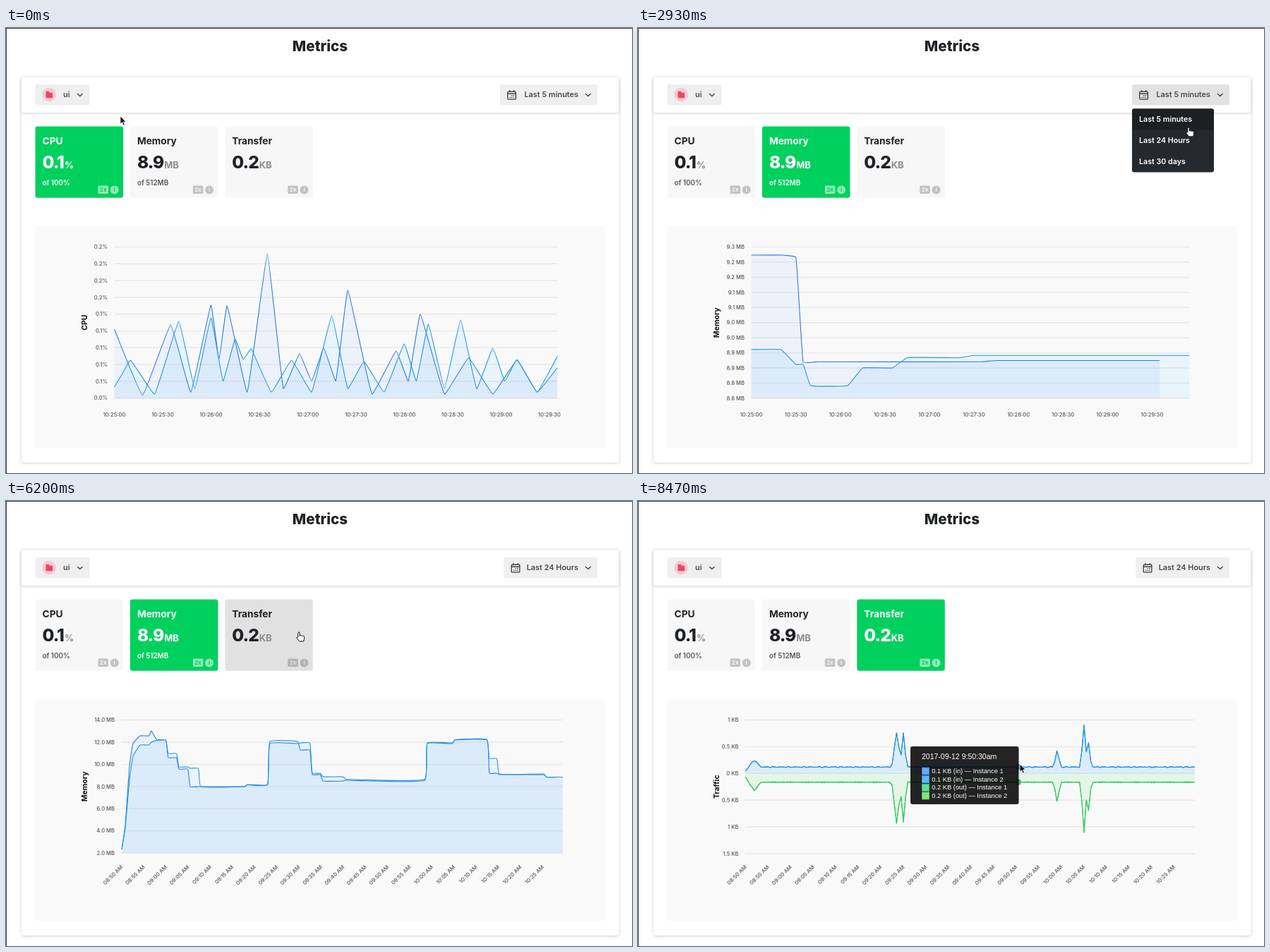
An HTML page that plays this animation: 887x631 px, repeating every 9.07 s.

```html
<!DOCTYPE html>
<html lang="en">
<head>
<meta charset="utf-8">
<title>Metrics</title>
<style>
  html, body { margin: 0; width: 100%; height: 100%; overflow: hidden; background: #fff; }
  svg { display: block; width: 887px; height: 631px; font-family: Inter, "Open Sans", sans-serif; }
  .panel { fill: #fff; filter: drop-shadow(0 1px 2px rgba(0, 0, 0, .18)); }
  .bold { font-weight: 700; }
  .title { font-size: 20.6px; font-weight: 800; fill: #1f2226; text-anchor: middle; }
  .button { fill: #efefef; }
  .button.hover { fill: #e2e2e2; }
  .label { font-size: 10.9px; font-weight: 600; fill: #4a4a4a; }
  .stroke { fill: none; stroke: #444; stroke-width: 1.4; }
  .card { fill: #1f2226; --bg: #f7f7f7; --badge: #c2c2c2; --unit: #8c8c8c; --note: #555; }
  .card.hover { --bg: #e1e1e1; --badge: #b3b3b3; }
  .card.active { fill: #fff; --bg: #00d05e; --badge: #8eeab6; --unit: #fff; --note: #fff; }
  .card .bg, .card .mark { fill: var(--bg); }
  .card .badge { fill: var(--badge); }
  .card .unit { fill: var(--unit); font-size: 13px; font-weight: 700; letter-spacing: 0; }
  .card .note { fill: var(--note); font-size: 9.9px; font-weight: 600; }
  .value { font-size: 24.5px; font-weight: 800; letter-spacing: -1px; }
  .grid { stroke: #e9e9e9; stroke-width: 1.5; }
  .tick { font-size: 7.6px; font-weight: 500; fill: #555; }
  .axis { font-size: 10.5px; font-weight: 700; fill: #111; text-anchor: middle; }
  .line { fill: none; stroke-width: 1.1; stroke-linejoin: round; }
  .item { font-size: 10.7px; font-weight: 600; fill: #fff; }
  #tip { font: 9.3px "Liberation Sans", Arial, sans-serif; fill: #fff; }
  #tip .head { font-size: 10.5px; }
</style>
</head>
<body>
<svg viewBox="0 0 887 631">
  <rect width="887" height="631" fill="#fff"/>
  <path d="M0 .5H887M.5 0V631" stroke="#444"/>
  <text class="title" x="445" y="33">Metrics</text>
  <rect class="panel" x="22" y="69.5" width="846.5" height="546.5" rx="3"/>
  <rect class="panel" x="22" y="69.5" width="846.5" height="50.5" rx="3"/>

  <rect class="button" x="41.5" y="80" width="77" height="29.5" rx="3"/>
  <circle cx="61" cy="94.5" r="10" fill="#f8ccd4"/>
  <path d="M56.5 91q0-1.2 1.2-1.2h2.8l1.4 2h3q1.2 0 1.2 1.2v5q0 1.2-1.2 1.2h-7.2q-1.2 0-1.2-1.2z" fill="#ee4560"/>
  <text class="label" x="81" y="98.3">ui</text>
  <path class="stroke" d="M101 93l3.8 3.6 3.8-3.6"/>

  <rect class="button" id="range" y="80" height="29.5" rx="3"/>
  <g id="calendar">
    <rect class="stroke" x=".8" y="2.3" width="11.6" height="10.8" rx="1.2"/>
    <path class="stroke" d="M.8 5.2h11.6M3.6 .3v2.5M9.7 .3v2.5"/>
    <path class="stroke" d="M6 8h1.4M8.7 8h1.4M3.5 10.6h1.4M6 10.6h1.4M8.7 10.6h1.4"/>
  </g>
  <text class="label" id="rangeText" x="811" y="98.3" text-anchor="end"></text>
  <path class="stroke" d="M821 93l3.8 3.6 3.8-3.6"/>

  <g id="cards"></g>
  <rect x="41.5" y="281" width="807" height="314" rx="2" fill="#f9f9f9"/>
  <g id="charts"></g>
  <g id="dots"></g>
  <g id="tip"><rect id="tipBox" rx="3" fill="#000" fill-opacity=".86"/><text class="head" x="16" y="18"></text></g>
  <g id="menu">
    <rect x="700" y="114.5" width="116" height="90" rx="3" fill="#24292d"/>
    <rect id="menuRow" x="700" width="116" height="30" rx="3" fill="#1c2023"/>
  </g>
  <g id="cursor">
    <path id="arrow" d="M0 0v11.2l2.6-2.4 1.8 4.2 2-.9-1.8-4h3.6z" fill="#111" stroke="#fff" stroke-width=".8"/>
    <path id="hand" transform="translate(-3.8 -.6)" d="M2.6 1.8a1.2 1.2 0 0 1 2.4 0v4a1.2 1.2 0 0 1 2.2.2a1.2 1.2 0 0 1 2.2.4a1.1 1.1 0 0 1 2 .7v3.2l-1 3.2h-6l-3.6-4.6a1.1 1.1 0 0 1 1.8-1.2z" fill="#fff" stroke="#111"/>
  </g>
</svg>
<script>
const LOOP = 9070, STEP = 200 / 3;
const $ = id => document.getElementById(id);

function add(parent, tag, attrs, text) {
  const node = document.createElementNS('http://www.w3.org/2000/svg', tag);
  set(node, attrs);
  if (text !== undefined) node.textContent = text;
  return parent.appendChild(node);
}
function set(node, attrs) { for (const key in attrs) node.setAttribute(key, attrs[key]); }
const show = (node, on) => node.setAttribute('visibility', on ? 'visible' : 'hidden');
const times = (n, f) => Array.from({ length: n }, (_, i) => f(i));
const pad = n => String(n).padStart(2, '0');

// Cards
const cards = [
  ['CPU', '0.1', '%', 'of 100%'],
  ['Memory', '8.9', 'MB', 'of 512MB'],
  ['Transfer', '0.2', 'KB', '']
].map(([name, value, unit, note], i) => {
  const x = 41.5 + i * 134.4;
  const g = add($('cards'), 'g', { transform: `translate(${x} 139.5)` });
  add(g, 'rect', { class: 'bg', width: 124.5, height: 101.3, rx: 3 });
  add(g, 'text', { class: 'bold', x: 10, y: 25.3, 'font-size': 13.7 }, name);
  const text = add(g, 'text', { class: 'value', x: 10, y: 59.3 }, value);
  add(text, 'tspan', { class: 'unit', dx: 1 }, unit);
  add(g, 'text', { class: 'note', x: 10, y: 83.3 }, note);
  add(g, 'rect', { class: 'badge', x: 89, y: 84, width: 14.5, height: 11.5, rx: 1.5 });
  add(g, 'text', { class: 'mark bold', x: 96.2, y: 92.7, 'font-size': 8, 'text-anchor': 'middle' }, '2x');
  add(g, 'circle', { class: 'badge', cx: 112.2, cy: 90, r: 6 });
  add(g, 'text', { class: 'mark bold', x: 112.2, y: 92.9, 'font-size': 8, 'text-anchor': 'middle' }, 'i');
  return { g, x };
});

['Last 5 minutes', 'Last 24 Hours', 'Last 30 days'].forEach((name, i) =>
  add($('menu'), 'text', { class: 'item', x: 710, y: 133 + i * 30 }, name));

// Curves
function yAt(pts, x) {
  const i = Math.max(1, pts.findIndex(p => p[0] >= x));
  const [a, b] = [pts[i - 1], pts[i]];
  return a[1] + (b[1] - a[1]) * (x - a[0]) / (b[0] - a[0]);
}

function smooth(pts, tension) {
  const handles = pts.map((p, i) => {
    const a = pts[i - 1] || p, b = pts[i + 1] || p;
    const da = Math.hypot(p[0] - a[0], p[1] - a[1]), db = Math.hypot(b[0] - p[0], b[1] - p[1]);
    const at = k => [p[0] + k * (b[0] - a[0]), p[1] + k * (b[1] - a[1])];
    return [at(-tension * da / (da + db)), at(tension * db / (da + db))];
  });
  return 'M' + pts[0] + pts.slice(1).map((p, i) =>
    `C${handles[i][1]} ${handles[i + 1][0]} ${p}`).join('');
}

const scaleX = (pts, x0, step) => pts.map(([k, y]) => [x0 + k * step, y]);

// CPU load falls back between peaks, deeper where they lie further apart
function peaks(list) {
  const pts = list.flatMap(([k, y], i) => {
    if (!i) return [[k, y]];
    const [k0, y0] = list[i - 1], gap = k - k0;
    return [[(k + k0) / 2, Math.max(525 - 220 / gap ** 2, (y + y0) / 2)], [k, y]];
  });
  return scaleX(pts, 153.5, 11.41);
}

// Levels hold until a short ramp leads to the next one
const steps = (rows, column) => rows.flatMap((row, i) => {
  const last = rows[i - 1], point = [row[0], row[column]];
  return last && row[0] - last[0] > 10 ? [[row[0] - 3.5, last[column]], point] : [point];
});

// Traffic is a calm level with spikes: centre, height, half width
const spikes = [[165, 10, 9], [366.5, 50, 7], [376, 48, 5], [594, 25, 5], [632, 60, 5], [638.5, 35, 4]];
const flow = (level, scale, seed) => times(200, i => {
  const x = 152 + i * 3.2;
  const spike = Math.max(0, ...spikes.map(([c, h, w]) => h * (1 - Math.abs(x - c) / w)));
  const noise = Math.sin(2.3 * i + seed) * Math.sin(.41 * i);
  const height = level * Math.min(1, (x - 149) / 8) + Math.abs(scale) * spike + noise;
  return [x, 386.5 - Math.sign(scale) * height];
});

const DARK = { line: '#2c7be0', fill: 'rgba(60,120,255,.06)' };
const LIGHT = { line: '#1c9ae0', fill: 'rgba(30,170,250,.08)' };
const GREEN = { line: '#1fc565', fill: 'rgba(50,215,100,.06)' };
const LIME = { line: '#3ccb62', fill: 'rgba(80,220,80,.06)' };

const cpuA = peaks([[0, 427], [7, 421], [12, 393], [14, 394], [19, 320], [23, 462], [26, 454], [29, 372],
  [35, 458], [38, 406], [44, 468], [50, 471], [55, 482]]);
const cpuB = peaks([[0, 509], [2, 471], [8, 416], [12, 411], [15, 441], [17, 455], [22, 471], [27, 408],
  [31, 473], [36, 448], [39, 420], [43, 414], [47, 454], [50, 470], [55, 466]]);
const memA = scaleX([[0, 322], [4, 322], [6, 325], [7, 474], [9, 473.3], [31, 473.3], [33, 471.5], [55, 471.5]],
  160.5, 10.52);
const memB = scaleX([[0, 456], [4, 456], [6, 477], [7, 477], [8, 507], [13, 507], [15, 482], [19, 482],
  [21, 467.5], [28, 467.5], [30, 464.3], [59, 464.3]], 160.5, 10.52);
// x and the level of each instance
const dayLevels = [
  [164, 494, 494], [169, 460, 464], [175, 375, 395], [180, 344, 362], [190, 333, 346], [206, 326, 342],
  [214, 339, 339], [230, 364, 358], [245, 380, 377], [261, 405, 379], [276, 405, 405], [342, 402.5, 402],
  [374, 341, 344], [417, 353, 343], [434, 388, 386], [449, 397, 391], [481, 396, 394.5], [597, 343, 344],
  [636, 338.5, 339], [685, 386, 365], [699, 388, 387], [766, 391.5, 391.5], [789, 391.5, 391.5]
];

const clock = (start, step, n, format) => times(n, i => {
  const t = start + i * step;
  return format(pad(Math.floor(t / 60)), pad(t % 60));
});
const quick = clock(25 * 60, 30, 10, (m, s) => `10:${m}:${s}`);
const slow = clock(530, 5, 20, (h, m) => `${h}:${m} AM`);

const charts = {
  cpu: {
    title: 'CPU', x0: 153.5, right: 781.5, base: 525, gap: 23.8, xGap: 68.5, xLabels: quick, tension: .09,
    yLabels: times(10, i => `0.${i < 4 ? 2 : i < 9 ? 1 : 0}%`),
    series: [[cpuA, DARK], [cpuB, LIGHT]]
  },
  memory: {
    title: 'Memory', x0: 160.5, right: 781.5, base: 525, gap: 21.45, xGap: 63.1, xLabels: quick, tension: .09,
    yLabels: times(11, i => (9.27 - i * .05).toFixed(1) + ' MB'),
    series: [[memA, DARK], [memB, LIGHT]]
  },
  day: {
    title: 'Memory', x0: 163.5, right: 789, base: 499, gap: 31.45, xGap: 31.4, xLabels: slow, tension: .12,
    yLabels: times(7, i => `${14 - 2 * i}.0 MB`),
    series: [[steps(dayLevels, 1), DARK], [steps(dayLevels, 2), LIGHT]],
    tip: { step: 3.15, width: 138, text: (y, i) => `${(2 + (499 - y) / 15.71).toFixed(1)} MB — Instance ${i + 1}` }
  },
  traffic: {
    title: 'Traffic', x0: 152, right: 789, base: 386.5, gap: 37.9, xGap: 31.95, xLabels: slow, tension: 0,
    yLabels: times(6, i => Math.abs(1 - i / 2) + ' KB'),
    series: [[flow(9.3, 1, 1), DARK], [flow(9.3, 1, 2), LIGHT],
      [flow(12.2, -1.18, 5.6), GREEN], [flow(12.2, -1.18, 3), LIME]],
    tip: {
      step: 3.2, width: 153.5,
      text: (y, i) => `${(Math.abs(y - 386.5) / 76).toFixed(1)} KB (${i < 2 ? 'in' : 'out'}) — Instance ${i % 2 + 1}`
    }
  }
};

for (const c of Object.values(charts)) {
  const g = c.g = add($('charts'), 'g', {});
  const bottom = 310.5 + c.gap * (c.yLabels.length - 1);
  c.yLabels.forEach((text, i) => {
    const y = 310.5 + i * c.gap;
    add(g, 'path', { class: 'grid', d: `M${c.x0} ${y}H${c.right}` });
    add(g, 'text', { class: 'tick', x: c.x0 - 9.5, y: y + 2.7, 'text-anchor': 'end' }, text);
  });
  c.xLabels.forEach((text, i) => {
    const x = c.x0 + i * c.xGap;
    const place = c.xLabels === quick
      ? { x, y: 550.7, 'text-anchor': 'middle' }
      : { transform: `translate(${x + 2.5} 519.5) rotate(-45)`, 'text-anchor': 'end' };
    add(g, 'text', { class: 'tick', ...place }, text);
  });
  add(g, 'text', { class: 'axis', transform: `translate(115 ${(310.5 + bottom) / 2}) rotate(-90)` }, c.title);
  for (const [pts, color] of c.series) {
    const d = smooth(pts, c.tension);
    add(g, 'path', { d: `${d}V${c.base}H${pts[0][0]}Z`, fill: color.fill });
    add(g, 'path', { class: 'line', d, stroke: color.line });
  }
}

// Tooltip
const dots = times(4, () => add($('dots'), 'circle', { r: 3.6 }));
const rows = times(4, i => {
  const g = add($('tip'), 'g', { transform: `translate(16 ${29.5 + i * 11.65})` });
  const fill = ['#6fa9f6', '#66b2f3', '#6cd9a0', '#93de78'][i];
  const stroke = [DARK, LIGHT, GREEN, LIME][i].line;
  add(g, 'rect', { x: .5, y: .5, width: 10, height: 10, fill, stroke });
  return { g, text: add(g, 'text', { x: 14.3, y: 8.7 }) };
});

function drawTip(chart, x, y) {
  const { tip, series } = chart;
  const on = !!tip && y > 310 && y < 500 && x > chart.x0 + 1 && x < chart.right;
  show($('tip'), on);
  dots.forEach((dot, i) => show(dot, on && i < series.length));
  rows.forEach((row, i) => set(row.g, { display: i < series.length ? 'inline' : 'none' }));
  if (!on) return;
  const n = Math.floor((x - 1 - chart.x0) / tip.step), px = chart.x0 + n * tip.step;
  const ys = series.map(([pts]) => yAt(pts, px));
  const height = 35.4 + ys.length * 11.65;
  const mid = ys.reduce((a, b) => a + b) / ys.length + 1;
  const left = x <= 445 ? x : x - 1.5 - tip.width;
  ys.forEach((cy, i) => {
    set(dots[i], { cx: px, cy, fill: series[i][1].line });
    rows[i].text.textContent = tip.text(cy, i);
  });
  set($('tipBox'), { width: tip.width, height });
  set($('tip'), { transform: `translate(${left} ${Math.round(mid - height / 2)})` });
  const minutes = 530 + Math.floor(n / 2);
  $('tip').querySelector('.head').textContent =
    `2017-09-12 ${Math.floor(minutes / 60)}:${pad(minutes % 60)}:${n % 2 ? '30' : '00'}am`;
}

// Pointer moves: start, end, x, y
const moves = [
  [300, 930, 215, 167], [1270, 2130, 812, 127], [2180, 2440, 814, 91], [2540, 2930, 780, 141],
  [3070, 3530, 770, 153], [4480, 5400, 478, 385], [5440, 6180, 415, 186], [7230, 7330, 431, 187],
  [7420, 8000, 386, 336], [8000, 8460, 541, 373]
];

const pointer = t => moves.reduce(([px, py], [from, to, x, y]) => {
  const u = Math.min(1, Math.max(0, (t - from) / (to - from))), k = u * u * (3 - 2 * u);
  return [px + (x - px) * k, py + (y - py) * k];
}, [162, 125]);

function draw(now) {
  // Motion advances 15 times a second
  const t = Math.floor((now % LOOP + 5) / STEP) * STEP;
  const [x, y] = pointer(t);
  const inside = (l, top, w, h) => x >= l && x <= l + w && y >= top && y <= top + h;

  const active = t < 930 ? 0 : t < 6460 ? 1 : 2;
  const name = t < 995 ? 'cpu' : t < 3860 ? 'memory' : t < 6520 ? 'day' : 'traffic';
  const open = t > 2480 && t < 3860, day = t >= 3860, left = day ? 705.5 : 700;

  let hand = false;
  cards.forEach((card, i) => {
    const over = inside(card.x, 139.5, 124.5, 101.5);
    hand = hand || over;
    set(card.g, { class: 'card' + (i === active ? ' active' : over ? ' hover' : '') });
  });
  const overRange = inside(left, 80, 838 - left, 29.5);
  hand = hand || overRange || open && inside(700, 114, 116, 90);

  set($('range'), { x: left, width: 838 - left, class: 'button' + (overRange || open ? ' hover' : '') });
  set($('calendar'), { transform: `translate(${left + 10} 88)` });
  $('rangeText').textContent = day ? 'Last 24 Hours' : 'Last 5 minutes';

  show($('menu'), open);
  const row = Math.min(2, Math.max(0, Math.floor((y - 114) / 30)));
  set($('menuRow'), { y: 114.5 + row * 30 });

  for (const key in charts) show(charts[key].g, key === name);
  drawTip(charts[name], x, y);

  set($('cursor'), { transform: `translate(${x} ${y})` });
  show($('hand'), hand);
  show($('arrow'), !hand);
}

const start = performance.now();
function tick() {
  draw(performance.now() - start);
  requestAnimationFrame(tick);
}
tick();
</script>
</body>
</html>
```
